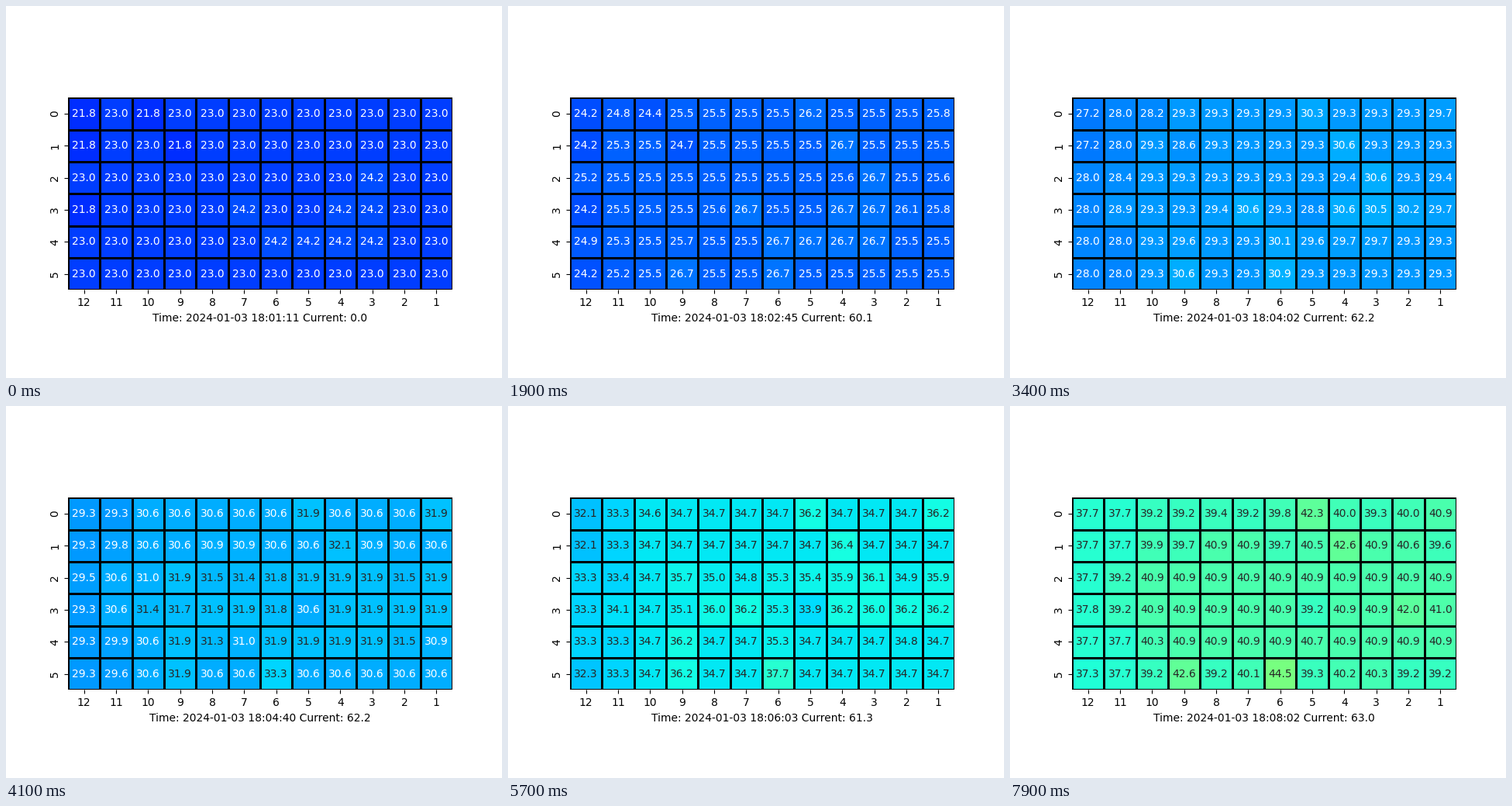
A matplotlib script for the animation above (8000 ms loop, 640 by 480 pixels).

```python
import matplotlib.pyplot as plt
import numpy as np
from matplotlib.animation import FuncAnimation

FRAMES, STEP_MS = 80, 100
ROWS, COLS = 6, 12
HEAT_ON, END = 8, 79
SHARP = 3  # how quickly a reading moves from one sensor step to the next

row, col = np.mgrid[:ROWS, :COLS]

# Before heating: a cool corner and a warm patch, one sensor step off
start = np.zeros((ROWS, COLS))
start[[0, 0, 1, 1, 3], [0, 2, 0, 3, 0]] = -1
start[2:5, 9] = start[3, [5, 8]] = start[4, 6:9] = 1

# While heating: left columns lag, middle rows lead, some cells run hot
spread = 0.9 * np.exp(-((row - 2.7) / 1.5) ** 2) - 0.2
spread -= 1.8 / (1 + (col / 1.3) ** 4)
spread += np.random.default_rng(4).uniform(-0.2, 0.2, spread.shape)
for r, c, boost in [(5, 6, 2.7), (5, 3, 1.7), (1, 8, 1.5), (0, 7, 1.4),
                    (0, 11, 1.0), (4, 3, 0.8), (3, 10, 0.5), (3, 7, -1.3)]:
    spread[r, c] += boost


def to_temp(level):
    """Temperature for a sensor level, resting on whole steps."""
    base = np.floor(level)
    k = base + np.clip((level - base - 0.5) * SHARP + 0.5, 0, 1)
    return 22.98 + 1.225 * k + 0.0057 * k ** 2 + 0.000036 * k ** 4


def temps(frame):
    trend = np.interp(frame, [HEAT_ON, 48, END], [0, 7.6, 12.5])
    w = max(0, (frame - HEAT_ON) / (END - HEAT_ON)) ** 0.5
    return to_temp(trend + w * spread + (1 - w) * start)


def caption(frame):
    marks = [0, 19, 34, 48, 57, 69, 79]
    passed = np.interp(frame, marks, [0, 94, 171, 247, 292, 356, 411])
    secs = 71 + int(round(passed))
    amps = 0.0
    if frame >= HEAT_ON - 2:
        amps = np.interp(frame, marks[1:], [60.1, 62.2, 62.3, 61.3, 61.1, 63.0])
    return (f"Time: 2024-01-03 18:{secs // 60:02d}:{secs % 60:02d} "
            f"Current: {amps:.1f}")


def ink(rgb):
    """Dark text on light cells, white on dark ones."""
    lin = np.where(rgb <= 0.03928, rgb / 12.92, ((rgb + 0.055) / 1.055) ** 2.4)
    return ".15" if lin @ [0.2126, 0.7152, 0.0722] > 0.408 else "w"


fig, ax = plt.subplots(figsize=(6.4, 4.8), dpi=100)
mesh = ax.pcolormesh(temps(0), cmap="jet", vmin=10, vmax=80,
                     edgecolors="black", linewidths=2)
ax.set(xlim=(0, COLS), ylim=(ROWS, 0), aspect="equal")
ax.spines[:].set_visible(False)
ax.set_xticks(np.arange(COLS) + 0.5, range(COLS, 0, -1))
ax.set_yticks(np.arange(ROWS) + 0.5, range(ROWS), rotation="vertical",
              va="center")
labels = [ax.text(c + 0.5, r + 0.5, "", ha="center", va="center")
          for r in range(ROWS) for c in range(COLS)]


def draw(frame):
    grid = temps(frame)
    mesh.set_array(grid)
    colors = mesh.to_rgba(grid.ravel())[:, :3]
    for label, temp, rgb in zip(labels, grid.ravel(), colors):
        label.set(text=f"{temp:.1f}", color=ink(rgb))
    ax.set_xlabel(caption(frame))
    return [mesh, *labels]


anim = FuncAnimation(fig, draw, frames=FRAMES, interval=STEP_MS,
                     init_func=lambda: draw(0), repeat=True, repeat_delay=0)
plt.show()
```
